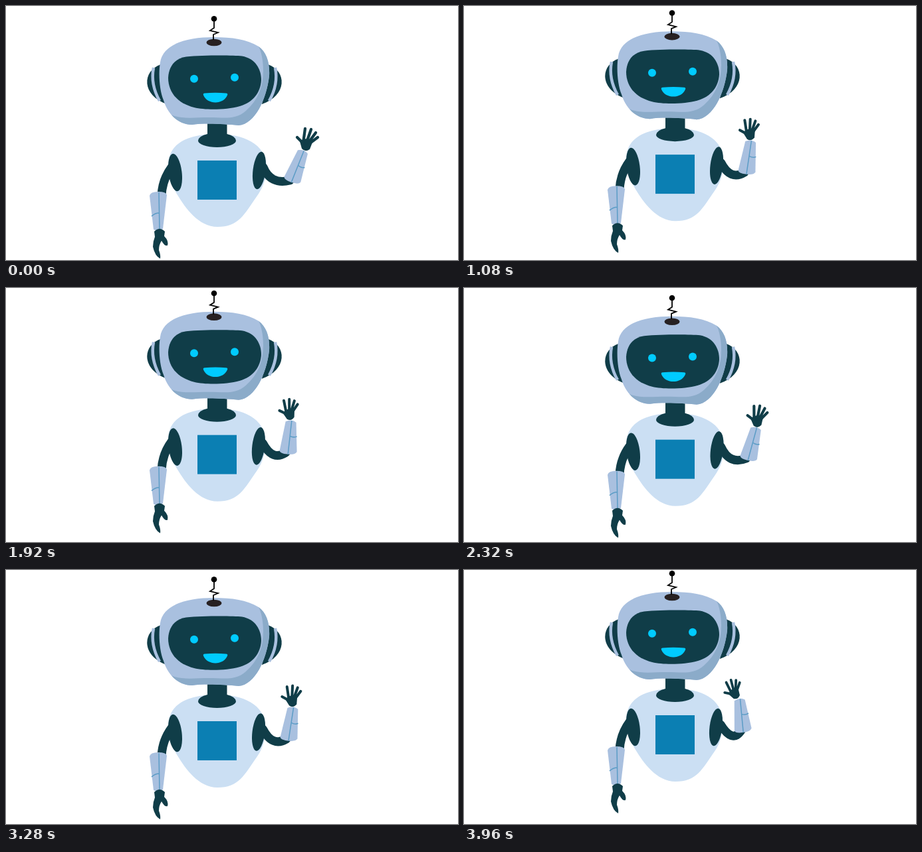
These frames come from a looping animation (680x383 px, 4 s). An HTML page:

```html
<!DOCTYPE html>
<html lang="en">
<head>
<meta charset="utf-8">
<title>Waving robot</title>
<style>
  html, body { margin: 0; width: 100%; height: 100%; overflow: hidden; background: #fff; }
  svg { display: block; width: 100vw; height: 100vh; }
  .dark { fill: #103d48; }
  .light { fill: #a9c0df; }
  .glow { fill: #00cbff; }
  .limb { fill: none; stroke: #103d48; stroke-width: 13; stroke-linecap: round; }
  .seam { fill: none; stroke: #5b9cc6; stroke-width: 1.5; }
  .stripe { fill: none; stroke: #a9c0df; stroke-width: 4.5; }
  .finger { fill: none; stroke: #103d48; stroke-width: 4.3; stroke-linecap: round; stroke-linejoin: round; }
</style>
</head>
<body>
<svg viewBox="0 0 680 383">
  <defs>
    <g id="ear">
      <path class="dark" d="M233 88C204 98 204 135 242 148Z"/>
      <path class="stripe" d="M222 93Q217 118 231 143"/>
    </g>
  </defs>
  <g id="robot">
    <path id="torso" fill="#cbdff3"/>
    <path class="dark" d="M303 176H332.500V193Q345 196 346 203A28.500 10 0 0 1 289 203Q290 196 303 193Z"/>
    <rect x="288" y="233" width="59" height="59" fill="#0b7fb3"/>

    <path class="limb" d="M249 243Q235 262 234 286"/>
    <ellipse class="dark" cx="254.500" cy="251" rx="10" ry="28.500" transform="rotate(-7 254.500 251)"/>
    <path class="light" d="M216 286Q217 280 229 280Q241 280 242 285L236 336Q229 341 222 337Z"/>
    <path class="seam" d="M230 281L231 338M219 317Q224 312 231 312"/>
    <path class="dark" d="M223 340Q231 332 239 340L238 347Q245 354 243 361Q239 363 234 354Q230 360 230 368Q233 376 232 381Q224 377 221 363Q221 355 224 348Z"/>

    <path class="limb" id="upperArm"/>
    <ellipse class="dark" id="shoulder" rx="9.500" ry="28.500"/>
    <g id="forearm">
      <g id="hand">
        <path class="dark" d="M-9-4Q-1-11 11-5L6 8Q-1 13-6 7Z"/>
        <path class="finger" d="M-13-10L-4-1L-1-23M1-2L8-22M4-2L15-17M6-1L18-10"/>
      </g>
      <g transform="translate(430 264) rotate(20.500)">
        <path class="light" d="M-13-2Q-12 2-1 2Q11 2 13-3L8-47Q1-52-8-47Z"/>
        <path class="seam" d="M0 2L1-49M0-26Q6-23 11-26"/>
      </g>
    </g>

    <use href="#ear"/>
    <use href="#ear" transform="translate(627) scale(-1 1)"/>
    <path class="light" d="M313 47C272 47 236 57 232 85C229 102 231 128 237 142C244 166 262 179 280 179C300 176 330 178 350 180C375 178 392 140 396 105C397 85 392 70 380 61C362 50 340 47 313 47Z"/>
    <path fill="#8babc9" d="M380 61C392 70 397 85 396 105C392 140 375 178 350 180C330 178 300 176 280 179C266 179 255 172 249 164C262 171 285 168 305 168C330 168 345 172 361 158C379 142 387 122 387 98C387 82 384 68 380 61Z"/>
    <path class="dark" d="M271 76.500C295 74 340 74 355 75.500C375 79 384 95 384 112C383 130 372 145 352 151C330 157 300 157 283 153C258 147 244 130 244 108C245 91 254 79 271 76.500Z"/>
    <circle class="glow" cx="283" cy="109.700" r="6"/>
    <circle class="glow" cx="344" cy="107.700" r="6"/>
    <path class="glow" d="M299 131.500Q315 130 331 131.500Q334 131.500 333 134.500C327 149 303 149 297 134.500Q296 131.500 299 131.500Z"/>
    <ellipse cx="313" cy="55" rx="11.500" ry="5.300" fill="#272122"/>
    <path d="M313 21V33L307 37L319 40L312 43V51" fill="none" stroke="#000" stroke-width="1.8"/>
    <circle cx="313" cy="19.300" r="4.300"/>
  </g>
</svg>
<script>
  const LOOP = 4000, STEP = 40;
  // [time in ms, value]: body lift in pixels, arm swing from 0 (out) to 1 (in)
  const LIFT = [[0, 0], [120, 0], [400, .4], [640, 2], [760, 4], [1200, 10.5], [1510, 14],
    [1800, 12.7], [2320, 4.3], [2740, 0], [2960, 1], [3280, 5], [3440, 7.8], [3960, 14]];
  const SWING = [[0, 0], [120, 0], [640, .04], [760, .12], [1200, .64], [1480, 1],
    [1800, .68], [2320, .24], [2640, .14], [2960, .24], [3280, .48], [3440, .63], [3960, 1]];

  const $ = id => document.getElementById(id);
  const set = (id, attrs) => {
    for (const name in attrs) $(id).setAttribute(name, attrs[name]);
  };

  // Smooth curve through the keys, flat at every turning point
  function curve(keys, t) {
    const slope = i => keys[i + 1] && keys[i]
      ? (keys[i + 1][1] - keys[i][1]) / (keys[i + 1][0] - keys[i][0]) : 0;
    const tangent = i => {
      const a = slope(i - 1), b = slope(i);
      return a * b > 0 ? 2 * a * b / (a + b) : 0;
    };
    let i = 0;
    while (i < keys.length - 2 && t > keys[i + 1][0]) i++;
    const [t0, v0] = keys[i], [t1, v1] = keys[i + 1];
    const span = t1 - t0, u = Math.min(1, (t - t0) / span), w = 1 - u;
    return v0 * w * w * (1 + 2 * u) + v1 * u * u * (3 - 2 * u)
      + span * u * w * (tangent(i) * w - tangent(i + 1) * u);
  }

  function draw(t) {
    const s = curve(SWING, t), right = 392 - 3 * s;
    const ex = 430 - 10 * s, ey = 264 - 7 * s;
    const sx = 381 - 2 * s, sy = 248 + 3 * s;
    set('robot', { transform: `translate(0 ${-curve(LIFT, t)})` });
    set('torso', { d: `M318 193C355 193 ${right} 207 ${right} 243C${right} 262 385 276 378 286`
      + 'C358 315 350 333 318 333C290 333 270 305 258 285C248 268 244 258 244 240C244 212 266 193 318 193Z' });
    set('shoulder', { cx: sx, cy: sy, transform: `rotate(7 ${sx} ${sy})` });
    set('upperArm', { d: `M${387 - s} ${243 + 4 * s}Q${398 + 6 * s} ${270 + 6 * s} ${ex - 3} ${ey - 1}` });
    set('forearm', { transform: `translate(${ex} ${ey}) rotate(${-27 * s}) translate(-430 -264)` });
    set('hand', { transform: `translate(${451 - 7 * s} ${208 - s}) rotate(${-7 * s}) scale(${1 - .12 * s})` });
  }

  function tick() {
    draw(Math.floor(performance.now() % LOOP / STEP) * STEP);
    requestAnimationFrame(tick);
  }
  tick();
</script>
</body>
</html>
```
